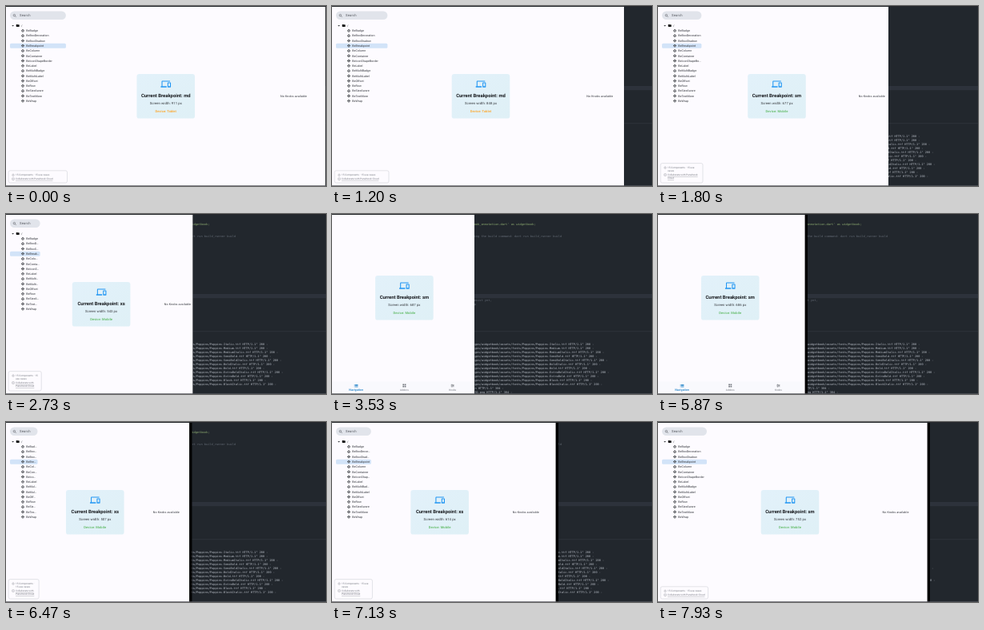
Recreate the animation shown at these times as an HTML page. Size 400 px wide and 225 px high, loop 8 s.

```html
<!DOCTYPE html>
<html lang="en">
<head>
<meta charset="utf-8">
<title>Resizing window</title>
<style>
html, body { margin: 0; width: 100%; height: 100%; overflow: hidden; background: #22272d; }
svg { display: block; width: 100vw; height: 100vh; font-family: Roboto, sans-serif; text-rendering: geometricPrecision; }
.mono { font-family: "DejaVu Sans Mono", monospace; white-space: pre; }
</style>
</head>
<body>
<svg id="stage" viewBox="0 0 400 225" xmlns="http://www.w3.org/2000/svg">
  <defs>
    <clipPath id="win"><rect id="clip" width="400" height="225"/></clipPath>
    <linearGradient id="tint" x2="1" y2="1">
      <stop stop-color="#e2f1fa"/><stop offset="1" stop-color="#dff0f6"/>
    </linearGradient>
  </defs>
  <g id="ide"></g>
  <rect id="frame" height="225" fill="#000"/>
  <rect id="page" height="225" fill="#fdfbff"/>
  <g id="app" clip-path="url(#win)"></g>
  <rect width="400" height="1" fill="#24262a"/>
  <rect y="224.3" width="400" height=".7" fill="#55575c"/>
</svg>
<script>
const LOOP = 8000, TICK = 1000 / 15, PX = 3.8;
const el = id => document.getElementById(id);
const pen = document.createElement('canvas').getContext('2d');

// [tick, width] points for the window edge and the slower page layout
const EDGE = [[14, 399.2], [27, 288], [40, 238], [53, 178], [67, 131], [79, 131], [88, 187], [107, 283], [119, 340]];
const LAYOUT = [[14, 399.5], [15, 397], [27, 297], [40, 243], [53, 180.8], [67, 131.6], [80, 131.6], [88, 180.5], [107, 269.3], [119, 330]];
const ITEMS = ('BeBadge BeBoxDecoration BeBoxShadow BeBreakpoint BeColumn BeContainer BeIconShapeBorder BeLabel ' +
  'BeMultiBadge BeMultiLabel BeOffset BeRow BeSizeAware BeTextMore BeWrap').split(' ');
const DEVICES = 'M4 6h18V4H4c-1.1 0-2 .9-2 2v11H0v3h14v-3H4zm19 2h-6c-.55 0-1 .45-1 1v10c0 .55.45 1 1 1h6c.55 0 1-.45 1-1V9c0-.55-.45-1-1-1zm-1 9h-4v-7h4z';

function lerpAt(points, x) {
  if (x <= points[0][0]) return points[0][1];
  for (let i = 1; i < points.length; i++) {
    const [a, p] = points[i - 1], [b, q] = points[i];
    if (x <= b) return p + (q - p) * (x - a) / (b - a);
  }
  return points[points.length - 1][1];
}

const esc = s => s.replace(/&/g, '&amp;').replace(/</g, '&lt;');
const text = (x, y, size, fill, str, more = '') =>
  `<text x="${x}" y="${y}" font-size="${size}" fill="${fill}" ${more}>${esc(str)}</text>`;
const rect = (x, y, w, h, fill, more = '') =>
  `<rect x="${x}" y="${y}" width="${w}" height="${h}" fill="${fill}" ${more}/>`;
const path = (d, fill, more = '') => `<path d="${d}" fill="${fill}" ${more}/>`;
const MID = 'text-anchor="middle" ';

function measure(str, size) {
  pen.font = '100px Roboto, sans-serif';
  return pen.measureText(str).width * size / 100;
}

function ellipsis(str, size, room) {
  if (measure(str, size) <= room) return str;
  while (str && measure(str + '…', size) > room) str = str.slice(0, -1);
  return str + '…';
}

function wrap(str, size, room) {
  const lines = [''];
  for (const word of str.split(' ')) {
    const last = lines.length - 1;
    const joined = lines[last] ? lines[last] + ' ' + word : word;
    if (lines[last] && measure(joined, size) > room) lines.push(word);
    else lines[last] = joined;
  }
  return lines;
}

function editor() {
  const GREEN = '#8fae72', GREY = '#626973', PLAIN = '#a3abb8', GOLD = '#c5a974';
  const code = [
    [0, "import 'package:flutter/material.dart';", GREEN],
    [1, "import 'package:widgetbook/widgetbook.dart';", GREEN],
    [2, "import 'package:widgetbook_annotation/widgetbook_annotation.dart' as widgetbook;", GREEN],
    [4, '// This file does not exist yet,', GREY],
    [5, '// It will be generated in the next step running the build command: dart run build_runner build', GREY],
    [6, "import 'main.directories.g.dart';", GREEN],
    [10, '  runApp(const WidgetbookApp());', PLAIN],
    [14, 'class WidgetbookApp extends StatelessWidget {', GOLD],
    [15, '  const WidgetbookApp({super.key});', PLAIN],
    [18, '  Widget build(BuildContext context) {', PLAIN],
    [19, '    return Widgetbook.material(', PLAIN],
    [20, '      themeMode: ThemeMode.light,', PLAIN],
    [21, '      // The [directories] variable does not exist yet,', GREY],
    [22, '      // It will be generated in the next step', GREY],
    [23, '      directories: directories,', PLAIN]
  ];
  const fonts = 'Italic Medium MediumItalic SemiBold SemiBoldItalic BoldItalic Bold ExtraBoldItalic ExtraBold Black BlackItalic'.split(' ');
  const log = fonts.map(f => [`/assets/packages/widgetbook/assets/fonts/Poppins/Poppins-${f}.ttf`, 200]);
  log.push(['/manifest.json', 304], ['/icons/Icon-192.png', 304]);

  let out = rect(0, 0, 400, 225, '#22272d') + rect(0, 100, 400, 5.2, '#2d323b') + rect(0, 146.5, 400, .6, '#343a43');
  for (const [row, str, fill] of code) out += text(79, 4.4 + row * 5, 3.655, fill, str, 'class="mono"');
  out += text(137, 151.2, 2.9, '#7e8590', 'OUTPUT') + text(152.5, 151.2, 2.9, '#d5d9e0', 'TERMINAL') + rect(152.5, 153, 14, .5, '#9aa3b2');
  log.forEach(([file, status], i) => {
    out += text(129.6, 163.5 + i * 5, 3.54, '#b9bec7', `:30] "GET ${file} HTTP/1.1" ${status} -`, 'class="mono"');
  });
  return out;
}

function card(cx, cy, px) {
  const size = px < 640 ? 'xs' : px < 768 ? 'sm' : 'md';
  const [device, tone] = px < 768 ? ['Mobile', '#5bb85f'] : ['Tablet', '#ffa21f'];
  return rect(cx - 36.3, cy - 28, 72.6, 55.6, 'url(#tint)', 'rx="3.2"') +
    path(DEVICES, '#2196f3', `transform="translate(${cx - 6.3} ${cy - 21.7}) scale(.526)"`) +
    text(cx, cy + 1.2, 5.9, '#16181c', 'Current Breakpoint: ' + size, MID + 'font-weight="600"') +
    text(cx, cy + 9.9, 4.21, '#33363b', `Screen width: ${px} px`, MID + 'letter-spacing=".07"') +
    text(cx, cy + 20, 4.1, tone, 'Device: ' + device, MID + 'font-weight="500" letter-spacing=".07"');
}

function sidebar(nav) {
  const right = nav - 5, ink = '#33363b', soft = '#777a80';
  let out = rect(5, 6.5, right - 5, 10.6, '#e1e4eb', 'rx="5.3"') +
    '<g fill="none" stroke="#4b4e55" stroke-width=".55"><circle cx="10.4" cy="11.6" r="1.2"/><path d="M11.3 12.5l1.4 1.4"/></g>' +
    text(17, 13.4, 4.21, '#54575e', 'Search', 'letter-spacing=".13"');
  out += path('M7.2 24h2.8l-1.4 1.5z', ink) +
    path('M12.7 23.3q0-.4.4-.4h1l.4.4h1.8q.4 0 .4.4v1.9q0 .4-.4.4h-3.2q-.4 0-.4-.4z', '#111') +
    text(19, 25.7, 3.68, ink, '/');
  ITEMS.forEach((name, i) => {
    const y = 30.9 + i * 6.27;
    if (name === 'BeBreakpoint') out += rect(5, y - 3, right - 5, 6.1, '#d2e3f8', 'rx="1.6"');
    for (const [dx, dy] of [[0, -1.15], [1.15, 0], [0, 1.15], [-1.15, 0]])
      out += path(`M${21 + dx} ${y + dy - .9}l.9 .9l-.9 .9l-.9-.9z`, '#2c2f34');
    out += text(25.3, y + 1.3, 3.68, ink, ellipsis(name, 3.68, right - 26));
  });

  const room = nav - 18, size = 3.1;
  const top = wrap('15 Components · 15 use cases', size, room);
  const low = wrap('Collaborate with Panelnook Cloud', size, room);
  const rows = top.length + low.length, y0 = 221 - 6 - 4.6 * rows;
  out += rect(3.2, y0, nav - 6.6, 6 + 4.6 * rows, 'none', 'rx="2" stroke="#c3c5cb" stroke-width=".45"');
  let y = y0 + 6.5;
  out += `<circle cx="9" cy="${y - 1}" r="1.2" fill="none" stroke="${soft}" stroke-width=".4"/>`;
  for (const s of top) { out += text(12, y, size, soft, s); y += 4.1; }
  y += .8;
  out += rect(7.9, y - 2.2, 2.2, 2.2, 'none', `stroke="${soft}" stroke-width=".4"`);
  for (const s of low) { out += text(12, y, size, soft, s, 'text-decoration="underline"'); y += 4.1; }
  return out;
}

function tabs(w) {
  const blue = '#1c7fc7', grey = '#70747b';
  const [a, b, c] = [1, 3, 5].map(k => w * k / 6);
  let out = rect(0, 209.5, w, 15.5, '#f9f9fd');
  for (let i = 0; i < 3; i++) {
    const y = 213 + i * 1.3;
    out += rect(a - 2.3, y, .8, .8, blue) + rect(a - 1.1, y, 3.4, .8, blue);
    out += rect(c - 2, y, 4, .5, grey) + rect(c - 1 + (i % 2) * 1.5, y - .4, .6, 1.3, grey);
  }
  for (const [dx, dy] of [[-2, 0], [.3, 0], [-2, 2.3], [.3, 2.3]])
    out += rect(b + dx, 212.5 + dy, 1.7, 1.7, grey);
  return out + text(a, 221.2, 3.68, blue, 'Navigation', MID + 'font-weight="500"') +
    text(b, 221.2, 3.2, grey, 'Addons', MID) + text(c, 221.2, 3.2, grey, 'Knobs', MID);
}

function page(w) {
  if (w * PX < 840) return card(w / 2, 105, Math.round(w * PX)) + tabs(w);
  return sidebar(w * .2) + card(w / 2, 113, Math.round(w * .6 * PX)) +
    text(w * .9, 114.4, 3.68, '#33363b', 'No Knobs available', MID + 'letter-spacing=".1"');
}

let shown = -1;
function draw(ms) {
  const tick = Math.floor((ms % LOOP + 5) / TICK);
  if (tick === shown) return;
  shown = tick;
  const edge = lerpAt(EDGE, tick);
  const inner = edge - (tick >= 80 ? 3.4 : 0);
  el('frame').setAttribute('width', edge);
  for (const id of ['page', 'clip']) el(id).setAttribute('width', inner);
  el('app').innerHTML = page(lerpAt(LAYOUT, tick));
}

el('ide').innerHTML = editor();
const start = performance.now();
function loop() {
  draw(performance.now() - start);
  requestAnimationFrame(loop);
}
loop();
</script>
</body>
</html>
```
